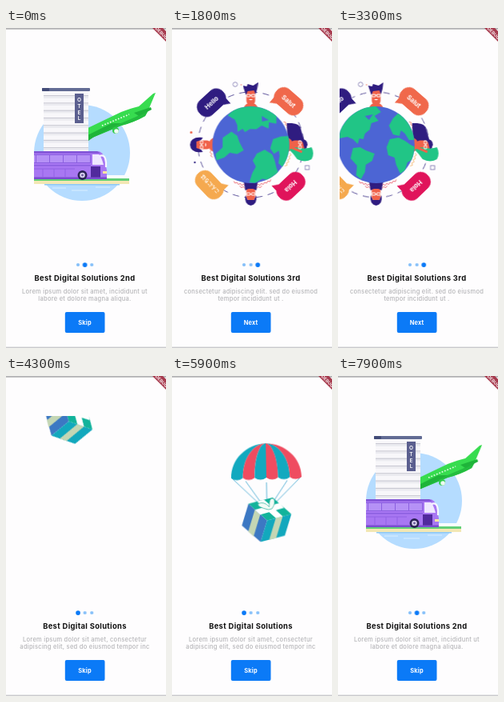
These frames come from a looping animation (200 px wide and 400 px high, 8 s). An HTML page:

```html
<!DOCTYPE html>
<html lang="en">
<head>
<meta charset="utf-8">
<title>Onboarding</title>
<style>
html, body { margin: 0; width: 100%; height: 100%; overflow: hidden; background: #fefdfe; }
svg { display: block; width: 100vw; height: 100vh; font-family: Inter, "Open Sans", sans-serif; text-anchor: middle; }
[class] { animation: 8s linear infinite; }

/* pages slide left, each to be followed by the next from the right */
.page { animation-timing-function: step-end; }
.page.one { animation-name: page1; }
.page.two { animation-name: page2; }
.page.three { animation-name: page3; }
@keyframes page1 {
  0% { transform: translateX(200px); }
  39.35% { transform: translateX(200px); animation-timing-function: cubic-bezier(.3,.2,.3,1); }
  49.35% { transform: none; }
  75% { transform: none; animation-timing-function: cubic-bezier(.3,.2,.3,1); }
  85%, 100% { transform: translateX(-200px); }
}
@keyframes page2 {
  0% { transform: none; }
  1.25% { transform: none; animation-timing-function: cubic-bezier(.3,.2,.3,1); }
  11.2% { transform: translateX(-200px); }
  11.3% { transform: translateX(200px); }
  75% { transform: translateX(200px); animation-timing-function: cubic-bezier(.3,.2,.3,1); }
  85%, 100% { transform: none; }
}
@keyframes page3 {
  0% { transform: translateX(200px); }
  1.25% { transform: translateX(200px); animation-timing-function: cubic-bezier(.3,.2,.3,1); }
  11.2% { transform: none; }
  39.35% { transform: none; animation-timing-function: cubic-bezier(.3,.2,.3,1); }
  49.35%, 100% { transform: translateX(-200px); }
}

/* captions swap as a slide passes its middle */
.copy { visibility: hidden; animation-timing-function: step-end; }
.copy.one { animation-name: copy1; }
.copy.two { animation-name: copy2; }
.copy.three { animation-name: copy3; }
@keyframes copy1 { 0% { visibility: hidden; } 42.6% { visibility: visible; } 78.25%, 100% { visibility: hidden; } }
@keyframes copy2 { 0% { visibility: visible; } 4.56% { visibility: hidden; } 78.25%, 100% { visibility: visible; } }
@keyframes copy3 { 0% { visibility: hidden; } 4.56% { visibility: visible; } 42.6%, 100% { visibility: hidden; } }

.dot { fill: #86c0f9; }
.dot.one { animation-name: dot1; }
.dot.two { animation-name: dot2; }
.dot.three { animation-name: dot3; }
@keyframes dot1 {
  0%, 42.6%, 81%, 100% { transform: none; fill: #86c0f9; }
  45%, 78.25% { transform: scale(1.35); fill: #0b7af7; }
}
@keyframes dot2 {
  0%, 4.56%, 81%, 100% { transform: scale(1.35); fill: #0b7af7; }
  7%, 78.25% { transform: none; fill: #86c0f9; }
}
@keyframes dot3 {
  0%, 4.56%, 45%, 100% { transform: none; fill: #86c0f9; }
  7%, 42.6% { transform: scale(1.35); fill: #0b7af7; }
}

.globe { animation-name: globe; }
@keyframes globe {
  0%, 4% { transform: rotate(110deg); animation-timing-function: ease-out; }
  11.25% { transform: rotate(52deg); }
  22.5% { transform: rotate(42deg); animation-timing-function: ease-in-out; }
  40%, 100% { transform: none; }
}
.head { animation-name: head; }
@keyframes head {
  0%, 6% { transform: translateY(30px); }
  11.25% { transform: translateY(8px); animation-timing-function: ease-out; }
  17%, 100% { transform: none; }
}
.bubble { animation-name: bubble; }
@keyframes bubble {
  0%, 12.5% { transform: scale(0); animation-timing-function: ease-out; }
  19% { transform: scale(1.12); }
  22% { transform: none; }
  27% { transform: rotate(3deg); }
  33% { transform: rotate(-2deg); }
  39%, 100% { transform: none; }
}
.ring { animation-name: ring; }
@keyframes ring {
  0%, 12.5% { opacity: 0; transform: rotate(-20deg); }
  19% { opacity: 1; }
  22.5% { transform: none; }
  42%, 100% { opacity: 1; transform: rotate(8deg); }
}
.extra { animation-name: extra; }
@keyframes extra { 0%, 12.5% { opacity: 0; } 19%, 100% { opacity: 1; } }

.fall { animation-name: fall; }
@keyframes fall {
  0%, 47.5% { transform: translate(104px, -41px); }
  55% { transform: translate(108px, 22px); }
  62.5% { transform: translate(117px, 84px); }
  68.75% { transform: translate(124px, 124px); animation-timing-function: ease-out; }
  73%, 100% { transform: translate(118px, 127px); }
}
.sway { animation: sway 8s ease-in-out infinite; }
@keyframes sway {
  0%, 47.5% { transform: rotate(5deg); }
  56% { transform: rotate(34deg); animation-timing-function: linear; }
  62.5% { transform: rotate(26deg); animation-timing-function: ease-out; }
  70% { transform: rotate(-4deg); }
  76%, 100% { transform: none; }
}
.swing { animation: swing 8s ease-in-out infinite; }
@keyframes swing {
  0%, 50% { transform: none; }
  62.5% { transform: rotate(14deg); }
  72%, 100% { transform: none; }
}

.bus { animation-name: bus; }
@keyframes bus {
  0%, 89%, 100% { transform: none; }
  3% { transform: none; animation-timing-function: step-end; }
  5%, 77.5% { transform: translateX(-95px); }
  82.5% { transform: translateX(-37px); animation-timing-function: ease-out; }
}
.road { animation-name: road; transform-origin: 35px 0; }
@keyframes road {
  0%, 11.2% { transform: none; animation-timing-function: step-end; }
  11.3%, 77.5% { transform: scaleX(0); }
  82.5% { transform: scaleX(.58); }
  87%, 100% { transform: none; }
}
.ground { animation-name: ground; transform-origin: 35px 0; }
@keyframes ground {
  0%, 11.2% { transform: none; animation-timing-function: step-end; }
  11.3%, 84% { transform: scaleX(0); }
  89%, 100% { transform: none; }
}
.hotel { animation-name: hotel; }
@keyframes hotel {
  0%, 11.2% { transform: none; animation-timing-function: step-end; }
  11.3%, 84.5% { transform: translateY(84px); animation-timing-function: ease-out; }
  91%, 100% { transform: none; }
}
.plane { animation-name: plane; }
@keyframes plane {
  0%, 11.2% { transform: none; animation-timing-function: step-end; }
  11.3%, 87.5% { transform: translate(-70px, 46px); }
  98.75% { transform: translate(-7px, 5px); }
  100% { transform: none; }
}
</style>
</head>
<body>
<svg viewBox="0 0 200 400">
  <defs>
    <clipPath id="sky"><rect y="50" width="200" height="230"/></clipPath>
    <clipPath id="lot"><rect x="35" y="60" width="165" height="170"/></clipPath>
    <clipPath id="front"><rect x="30" y="60" width="90" height="96"/></clipPath>
    <clipPath id="air"><rect x="103" y="60" width="97" height="95"/></clipPath>
    <clipPath id="ball"><circle r="48"/></clipPath>
  </defs>

  <g class="page one">
    <g clip-path="url(#sky)"><g class="fall"><g class="sway">
      <g class="swing">
        <path d="M-43 0L0 42M-26 4L0 42M0 6L0 42M26 4L0 42M43 0L0 42" fill="none" stroke="#35a2cf" stroke-width=".8"/>
        <g transform="translate(0 52) rotate(-40)">
          <path d="M-29-15L-5-30L-1 1L-25 16Z" fill="#3c78c3"/>
          <path d="M-25 16L-1 1L27 15L3 30Z" fill="#12a8bd"/>
          <path d="M-5-30L23-16L27 15L-1 1Z" fill="#12b39b"/>
          <path d="M-28-4L-4-19L-3-10L-27 5Z" fill="#c4d6b4"/>
          <path d="M-15 21L9 6L17 10L-7 25Z" fill="#c4d6b4"/>
          <path d="M-4-19L25-5L25 3L-3-10ZM5-25L13-21L17 10L9 6Z" fill="#fff"/>
          <path d="M9-8Q0-20 4-22Q12-20 12-10Q20-20 23-14Q22-8 13-6Z" fill="#f3fbf6" stroke="#12a890" stroke-width=".6"/>
        </g>
      </g>
      <g id="canopy"></g>
    </g></g></g>
  </g>

  <g class="page two">
    <circle cx="95" cy="156" r="60" fill="#b5dcff"/>
    <g clip-path="url(#air)"><g class="plane">
      <path d="M96 128L144 105Q157 100 166 98L184 82L187 81L179 100L174 110Q160 118 144 122L96 142Z" fill="#37dc4f"/>
      <path d="M96 136L146 118Q162 112 178 103L174 110Q160 118 144 122L96 142Z" fill="#24bd3f"/>
      <path d="M160 106L181 99L182 102L166 110Z" fill="#1fb43a"/>
      <path d="M96 137L132 119L144 119L110 136L96 146Z" fill="#1fb43a"/>
      <circle cx="137" cy="128" r="4" fill="#2fcc49"/>
      <circle cx="138" cy="129" r="2.800" fill="#eefaf3"/>
      <path d="M120 122L154 108" stroke="#f4fff5" stroke-width="1.600" stroke-dasharray="1.600 2"/>
    </g></g>
    <g clip-path="url(#front)"><g class="hotel">
      <rect x="47" y="79" width="56" height="77" fill="#f8f7fa"/>
      <g id="floors"></g>
      <rect x="45" y="75" width="60" height="4" rx="1" fill="#626b94"/>
      <rect x="45" y="75" width="9" height="4" rx="1" fill="#434c78"/>
      <rect x="86" y="82" width="11" height="37" fill="#5b5f8f"/>
      <g id="sign" fill="#fff" font-size="6.500" font-weight="600"></g>
    </g></g>
    <g clip-path="url(#lot)">
      <rect class="road" x="35" y="184" width="119" height="7" fill="#fbfdff"/>
      <g class="ground">
        <rect x="35" y="188" width="119" height="3" fill="#63cf77"/>
        <rect x="35" y="191" width="119" height="4" fill="#f3e7b4"/>
        <rect x="48" y="195" width="94" height="1.500" fill="#8dc8f5"/>
        <path d="M58 200h17M82 203h20M112 199h18" stroke="#d9eeff"/>
      </g>
      <g class="bus">
        <path d="M20 154H114Q121 154 123 163L126 178V187H20Z" fill="#a877f2"/>
        <path d="M20 154H114L118 156.500H20Z" fill="#8154d6"/>
        <rect x="20" y="158" width="86" height="11" fill="#8b5fe0"/>
        <g id="panes" fill="#b591f6"></g>
        <path d="M108 158H116Q119 160 122 171H108Z" fill="#efe8ff"/>
        <path d="M117 160Q124 157 125 168V174" fill="none" stroke="#f8f6ff" stroke-width="2.200"/>
        <path d="M20 171H106V172.500H20Z" fill="#8b5fe0"/>
        <path d="M20 176H86M46 176V186M60 176V186M74 176V186" stroke="#9162e4" fill="none"/>
        <path d="M106 173H118V187H106Z" fill="#512a9d"/>
        <path d="M20 186.500H126V189H20Z" fill="#7a4bd0"/>
        <rect x="121" y="179" width="5" height="3" fill="#ffe6a0"/>
        <circle cx="95.500" cy="184" r="6" fill="#2c2357"/>
        <circle cx="95.500" cy="184" r="3.300" fill="#d9d2ee"/>
        <circle cx="95.500" cy="184" r="1.400" fill="#6a5a9d"/>
      </g>
    </g>
  </g>

  <g class="page three"><g transform="translate(98.5 146)">
    <g class="ring"><circle r="66" fill="none" stroke="#5a5099" stroke-dasharray="8 6.800"/></g>
    <g class="extra" fill="none">
      <circle cx="-19.500" cy="-75.500" r="2.800" stroke="#7c74ae" stroke-width=".8"/>
      <rect x="68" y="26" width="5" height="5" stroke="#7c74ae" stroke-width=".8"/>
      <circle cx="-74.500" cy="-15.500" r="1.500" fill="#ef6248"/>
      <circle cx="-70" cy="22" r="1.200" fill="#40358c"/>
      <circle cx="-12" cy="-75" r=".7" fill="#ef6248"/>
      <g id="waves"></g>
    </g>
    <g id="people"></g>
    <circle r="48" fill="#4c65d4"/>
    <g class="globe"><g clip-path="url(#ball)" fill="#21c586">
      <path d="M-45-20L-32-37L-14-48L0-48L6-41L-2-36L3-30L-6-27L-8-19L-14-14L-16-7L-21-8L-23-1L-29-7L-36-10L-46-8Z"/>
      <path d="M-29 4L-20 3L-13 7L-2 11L-5 20L-13 25L-14 34L-19 43L-25 38L-24 26L-32 17Z"/>
      <path d="M16-24L21-33L28-40L38-32L49-14L49-6L41-6L36-14L31-18L29-11L21-13Z"/>
      <path d="M17-7L28-9L36-5L43 0L49 3L46 18L39 22L36 32L30 36L25 25L23 16L15 13L13 3Z"/>
      <path d="M-14-36L-4-38L-9-31Z" fill="#4c65d4"/>
    </g></g>
    <g id="talk"></g>
  </g></g>

  <rect width="2" height="400" fill="#fefdfe"/>
  <rect width="200" height="1.800" fill="#b3b3b5"/>
  <rect y="398.600" width="200" height="1.400" fill="#c9c9cc"/>
  <path d="M183 0H196L200 4V17Z" fill="#a63a4d"/>
  <text transform="translate(193 7.800) rotate(45)" font-size="5.500" font-weight="700" fill="#f7e9ec">DEBUG</text>

  <g id="dots"></g>
  <rect x="73.800" y="355" width="49.700" height="26" rx="2" fill="#0b7af7"/>
  <g id="copies"></g>
</svg>
<script>
const fill = (id, html) => document.getElementById(id).innerHTML = html;
const each = (list, make) => list.map(make).join('');
const range = n => [...Array(n).keys()];
const names = ['one', 'two', 'three'];

fill('dots', each(names, (n, i) =>
  `<g transform="translate(${90 + i * 8.6} 296)"><circle class="dot ${n}" r="2.1"/></g>`));

const copies = [
  ['Best Digital Solutions', 'Lorem ipsum dolor sit amet, consectetur', 'adipiscing elit, sed do eiusmod tempor inc', 'Skip'],
  ['Best Digital Solutions 2nd', 'Lorem ipsum dolor sit amet, incididunt ut', 'labore et dolore magna aliqua.', 'Skip'],
  ['Best Digital Solutions 3rd', 'consectetur adipiscing elit. sed do eiusmod', 'tempor incididunt ut .', 'Next']
];
const line = (y, size, weight, color, text, gap) =>
  `<text x="98.500" y="${y}" font-size="${size}" font-weight="${weight}" fill="${color}" letter-spacing="${gap}">${text}</text>`;
fill('copies', each(copies, ([title, a, b, button], i) => `<g class="copy ${names[i]}">` +
  line(316.2, 9.4, 700, '#111', title, .34) + line(332, 7.5, 500, '#b5b5b8', a, .27) +
  line(341.2, 7.5, 500, '#b5b5b8', b, .27) + line(371, 7.4, 700, '#fff', button, .15) + '</g>'));

// canopy gores narrow towards the crown
const rim = i => -44 + i * 88 / 6;
fill('canopy', each(range(6), i => {
  const a = rim(i), b = rim(i + 1);
  return `<path d="M${a} 0C${a} -24 ${a * .55} -42 0 -43C${b * .55} -42 ${b} -24 ${b} 0` +
    `Q${(a + b) / 2} 5 ${a} 0Z" fill="${i % 2 ? '#ef4c60' : '#12a9bf'}"/>`;
}));

fill('floors', each(range(8), i =>
  `<rect x="47" y="${84 + i * 9.3}" width="56" height="1.300" fill="#c9c9d3"/>` +
  `<rect x="47" y="${85.3 + i * 9.3}" width="56" height="2.500" fill="#ebebf0"/>`));
fill('sign', each([...'OTEL'], (c, i) => `<text x="91.500" y="${92 + i * 7.8}">${c}</text>`));
fill('panes', each(range(5), i => `<rect x="${21 + i * 17}" y="159" width="16" height="9"/>`));

// zigzag arc, degrees clockwise from the top
const zigzag = (from, to, r, color) => {
  const pts = range(Math.round((to - from) / 2.5) + 1).map(i => {
    const a = (from + i * 2.5) * Math.PI / 180, d = r + (i % 2 ? 1 : -1);
    return (d * Math.sin(a)).toFixed(1) + ',' + (-d * Math.cos(a)).toFixed(1);
  });
  return `<polyline points="${pts.join(' ')}" stroke="${color}" stroke-width=".7"/>`;
};
fill('waves', zigzag(150, 205, 51, '#e5424f') + zigzag(165, 195, 54, '#e5424f') +
  zigzag(102, 122, 51, '#f4a54a') + zigzag(55, 72, 51, '#ef6248') + zigzag(252, 266, 51, '#ef6248'));

const navy = '#2f1c80', skin = '#f0624a';
const face = `<path d="M-9 -46Q-7 -52 0 -53Q7 -52 9 -46Z" fill="${skin}"/>
  <rect x="-5.500" y="-70" width="11" height="20" rx="5" fill="${skin}"/>`;
const glasses = `<path d="M-5 -63h4v3h-4zM1 -63h4v3h-4zM-1 -62h2" fill="none" stroke="#fff" stroke-width=".9"/>`;
const smile = `<path d="M-2.500 -57Q0 -54.500 2.500 -57Z" fill="#fff"/>`;
const people = [
  face + `<path d="M-6 -62L-10 -74L-5 -73L-4 -76L3 -74L9 -78L8 -70L6 -63L4 -68L-4 -67Z" fill="${navy}"/>` + glasses + smile,
  `<path d="M-27 -45Q-28 -58 -22 -62Q-14 -64 -8 -66L4 -70L7 -64L0 -46Z" fill="${navy}"/>` + face +
    `<path d="M3 -56Q6 -68 3 -76Q11 -80 18 -76Q23 -68 18 -58Q12 -54 6 -48Z" fill="#21c586"/>
    <path d="M3 -50L9 -64" stroke="${skin}" stroke-width="3"/>
    <path d="M-7 -61Q-8 -71 0 -71Q4 -70 5 -67L-3 -65Z" fill="${navy}"/>` + glasses,
  face + `<path d="M-7 -57Q-8 -49 -9 -46H9Q8 -49 7 -57L3 -55H-3Z" fill="${navy}"/>
    <path d="M-7 -63Q-8 -75 0 -76Q8 -75 7 -63L4 -69H-4Z" fill="${navy}"/>` + glasses,
  face + `<path d="M-9 -60Q-11 -75 0 -76Q11 -75 9 -60L6 -62L4 -68L-4 -68L-6 -62Z" fill="${navy}"/>` + glasses + smile
];
fill('people', each(people, (p, i) => `<g transform="rotate(${i * 90})"><g class="head">${p}</g></g>`));

const talk = [['Salut', '#f0684b', 41], ['Hola', '#e0145b', 136], ['こんにちは', '#f5a94f', 226], ['Hello', navy, -43]];
fill('talk', each(talk, ([word, color, angle], i) => `<g transform="rotate(${angle}) translate(0 -72)">
  <g class="bubble"><rect x="-20" y="-12" width="40" height="24" rx="11" fill="${color}"/>
  <path d="M${i % 2 ? '6 10L17 17L17 5' : '-6 10L-17 17L-17 5'}Z" fill="${color}"/>
  <text y="2.800" font-size="${i === 2 ? 6 : 8}" font-weight="700" fill="#fff"
    font-family="Inter, 'Noto Sans CJK JP', 'Noto Sans CJK', sans-serif">${word}</text></g></g>`));
</script>
</body>
</html>
```
